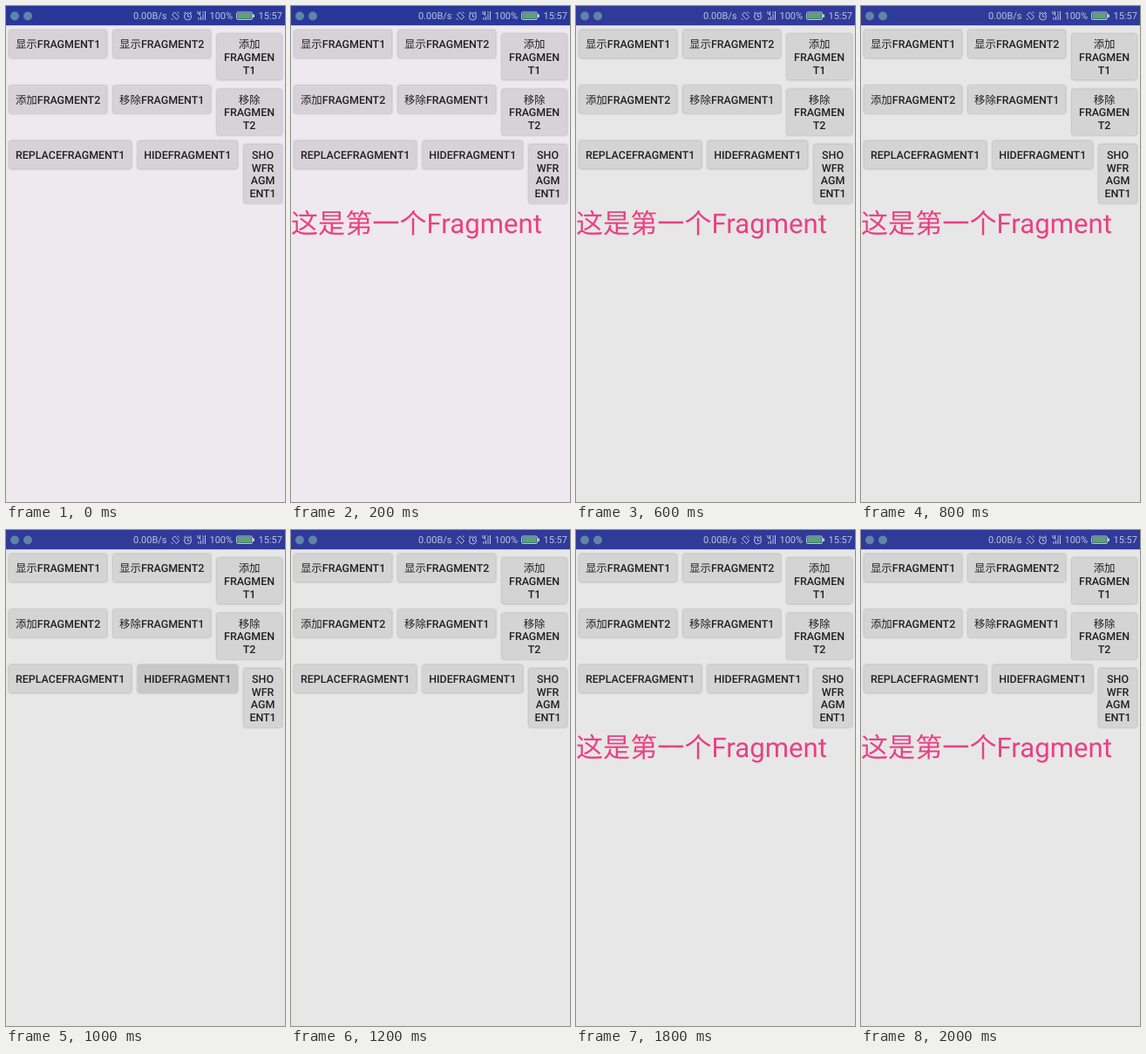
Recreate the animation shown at these times as an HTML page. Size 320 by 568 pixels, loop 2200 ms.

```html
<!DOCTYPE html>
<html lang="zh-CN">
<head>
<meta charset="utf-8">
<style>
html, body { margin: 0; height: 100%; overflow: hidden; }
svg { display: block; width: 320px; height: 568px; background: var(--page);
  font-family: Roboto, "Noto Sans CJK SC", "Noto Sans CJK", sans-serif; }
text { text-rendering: geometricPrecision; }
.button rect { fill: var(--button); filter: drop-shadow(0 .8px .8px #0005); }
.button.pressed rect { fill: var(--pressed); }
.button text { font-size: 12.44px; font-weight: 500; text-anchor: middle; fill: #202022; }
.button .han { font-weight: 400; }
#bar { fill: var(--bar); }
#status text { font-size: 11px; fill: #bcc4e0; }
.icon { fill: none; stroke: #bcc4e0; stroke-width: 1; }
#label { font-size: 31.11px; fill: #e9417f; }
</style>
</head>
<body>
<svg viewBox="0 0 320 568">
  <path id="shade" fill="#e8e8e9" d="M0 22H320V568H288V240H0Z"/>
  <g id="status">
    <rect id="bar" width="320" height="22.2"/>
    <circle cx="10" cy="11.5" r="5" fill="#5f84a8"/>
    <circle cx="25" cy="11.5" r="5" fill="#5f84a8"/>
    <text x="146" y="15.3">0.00B/s</text>
    <path class="icon" d="M190.5 10L193.5 7L198.5 12.5L195.5 15.5ZM189.5 14L191.5 16M196.5 6.5L198.5 8.5"/>
    <g class="icon">
      <circle cx="208.5" cy="12" r="4"/>
      <path d="M208.5 9.5V12.3H210.5M204 8.5L206.2 6.7M213 8.5L210.8 6.7"/>
    </g>
    <path class="icon" d="M220 6V9H223M222.5 6V11M221 16V13M223.5 16V12M226 16V9M228.5 16V6M225 6.5L227 8"/>
    <text x="233.5" y="15.3">100%</text>
    <rect class="icon" x="264.5" y="7" width="18" height="8.5" rx="1.5"/>
    <rect x="265.5" y="8" width="16" height="6.5" fill="#58a769"/>
    <rect x="283" y="9.5" width="2" height="3.5" fill="#bcc4e0"/>
    <text x="289.5" y="15.3">15:57</text>
  </g>
  <g id="buttons"></g>
  <text id="label" x="0" y="260.1">这是第一个Fragment</text>
</svg>
<script>
const LOOP = 2200;
const LINE = 14.58, ONE_LINE = 23.6, MIN_HEIGHT = 32;
const FIRST_BASELINE = 48.4, ROW = 63.45;
const $ = id => document.getElementById(id);

// row, x, width, lines
const buttons = [
  [0, 3.6, 112, '显示FRAGMENT1'],
  [0, 122.7, 112, '显示FRAGMENT2'],
  [0, 241.8, 74.6, '添加|FRAGMEN|T1'],
  [1, 3.6, 112, '添加FRAGMENT2'],
  [1, 122.7, 112, '移除FRAGMENT1'],
  [1, 241.8, 74.6, '移除|FRAGMEN|T2'],
  [2, 3.6, 140.2, 'REPLACEFRAGMENT1'],
  [2, 150.9, 114.7, 'HIDEFRAGMENT1'],
  [2, 272.7, 43.7, 'SHO|WFR|AGM|ENT1'],
];
const ADD = 2, HIDE = 7;

// Buttons in a row share the baseline of their first line.
$('buttons').innerHTML = buttons.map(([row, x, width, text]) => {
  const lines = text.split('|');
  const baseline = FIRST_BASELINE + row * ROW;
  const content = ONE_LINE + (lines.length - 1) * LINE;
  const height = Math.max(MIN_HEIGHT, content);
  const y = baseline - 16.7 - (height - content) / 2;
  const texts = lines.map((line, i) => {
    const styled = line.replace(/[^\x00-\x7f]+/, '<tspan class="han">$&</tspan>');
    return `<text x="${x + width / 2}" y="${baseline + i * LINE}">${styled}</text>`;
  });
  return `<g class="button"><rect x="${x}" y="${y}" width="${width}" height="${height}" rx="1.8"/>${texts.join('')}</g>`;
}).join('');

const themes = {
  warm: { page: '#eee8ef', button: '#d7d2d8', pressed: '#c9c5ca', bar: '#293898' },
  cool: { page: '#eeeff4', button: '#dddade', pressed: '#cbc9cb', bar: '#2d3d98' },
  grey: { page: '#e7e7e7', button: '#d4d4d4', pressed: '#c8c8c8', bar: '#303a98' },
};

// start time, theme, label visible, pressed button
const states = [
  [0, 'warm', false],
  [200, 'warm', true],
  [400, 'cool', true, ADD],
  [600, 'grey', true],
  [1000, 'grey', false, HIDE],
  [1200, 'grey', false],
  [1800, 'grey', true],
];

const svg = document.querySelector('svg');
const buttonNodes = [...$('buttons').children];

function draw() {
  const time = performance.now() % LOOP;
  const [, theme, visible, pressed] = states.findLast(state => state[0] <= time);
  for (const [name, colour] of Object.entries(themes[theme])) {
    svg.style.setProperty('--' + name, colour);
  }
  $('shade').style.display = theme === 'cool' ? '' : 'none';
  $('label').style.display = visible ? '' : 'none';
  buttonNodes.forEach((node, i) => node.classList.toggle('pressed', i === pressed));
  requestAnimationFrame(draw);
}
draw();
</script>
</body>
</html>
```
